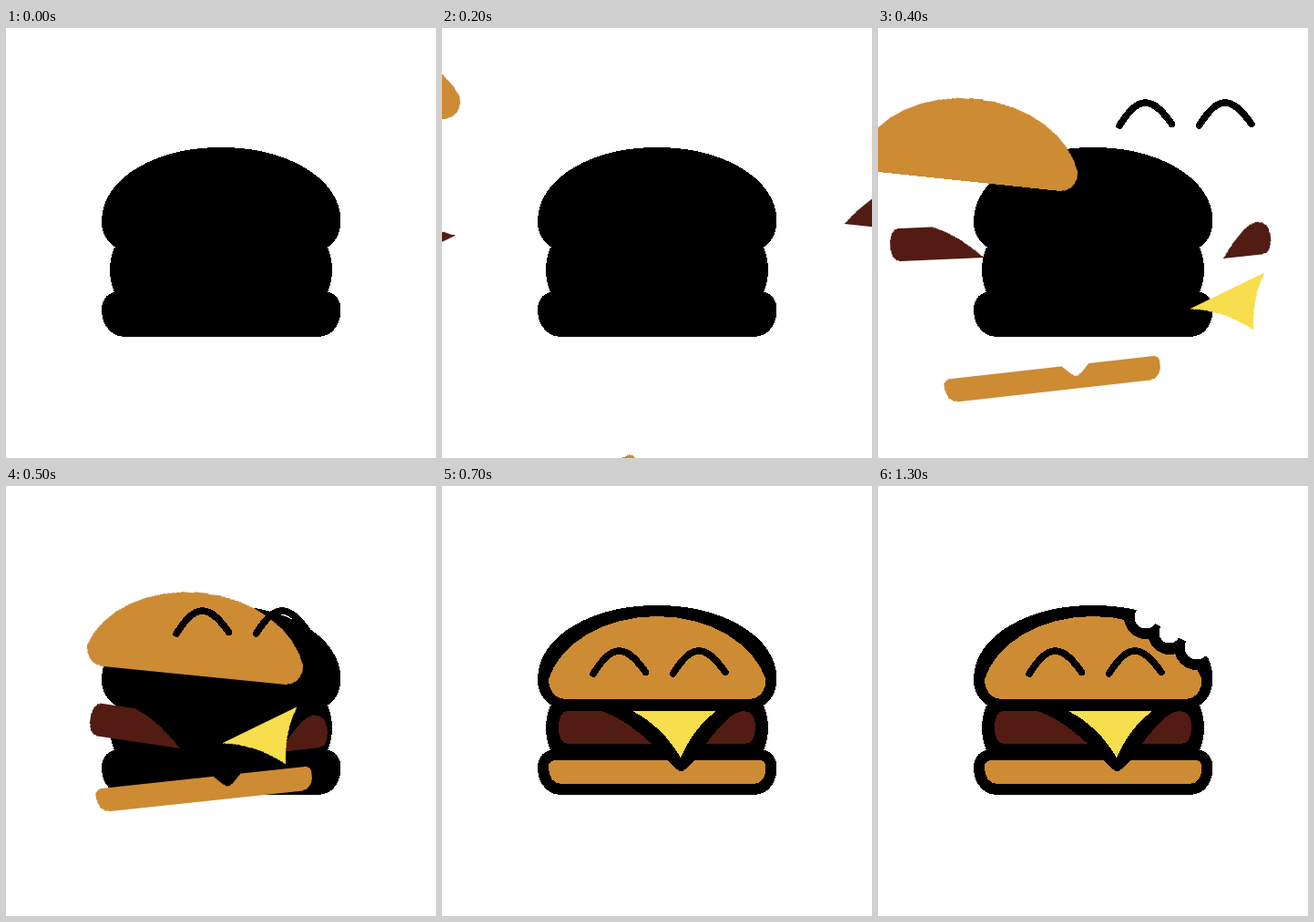
These frames come from a looping animation (472 by 472 pixels, 1.9 s). An HTML page:

```html
<!DOCTYPE html>
<html lang="en">
<head>
<meta charset="utf-8">
<title>Burger</title>
<style>
  html, body { margin: 0; width: 100%; height: 100%; overflow: hidden; background: #fff; }
  svg { display: block; width: 472px; height: 472px; shape-rendering: crispEdges; }

  .bun { fill: #cd8b34; }
  .meat { fill: #521c12; }
  .cheese { fill: #f7de4d; }
  .ink { stroke: #000; stroke-width: 24; stroke-linejoin: round; }
  .eye { fill: none; stroke: #000; stroke-width: 7.6; stroke-linecap: round; }

  .fly { animation: 1900ms step-end infinite; }
  #top    { transform-origin: 236.5px 188px;   animation-name: top; }
  #bottom { transform-origin: 236.5px 313.5px; animation-name: bottom; }
  #left   { transform-origin: 230px 282px;     animation-name: left; }
  #right  { transform-origin: 290px 282px;     animation-name: right; }
  #cheese { transform-origin: 209px 247px;     animation-name: cheese; }
  #eyes   { animation-name: eyes; }
  #bite   { animation: bite 1900ms step-end infinite; }

  /* one step every 100 ms, then the assembled burger rests */
  @keyframes top {
    0%      { transform: translate(-600px, -200px); }
    5.263%  { transform: translate(-440px, -150px) rotate(-14deg); }
    10.526% { transform: translate(-338px, -120px) rotate(-8deg); }
    15.789% { transform: translate(-234px, -92px) rotate(-1.6deg); }
    21.052% { transform: translate(-132.7px, -65.4px) rotate(6deg); }
    26.315% { transform: translate(-26px, -26px) rotate(5.7deg); }
    31.578% { transform: translate(-4px, 1px) rotate(1.5deg); }
    36.842%, 100% { transform: none; }
  }
  @keyframes bottom {
    0%      { transform: translate(-250px, 400px); }
    5.263%  { transform: translate(-190px, 290px) rotate(-30deg); }
    10.526% { transform: translate(-131px, 211px) rotate(-23deg); }
    15.789% { transform: translate(-83.5px, 135.5px) rotate(-15deg); }
    21.052% { transform: translate(-44.5px, 71.5px) rotate(-6.4deg); }
    26.315% { transform: translate(-18.5px, 19px) rotate(-6.1deg); }
    31.578% { transform: translate(-4px, 5px) rotate(-2.5deg); }
    36.842%, 100% { transform: none; }
  }
  @keyframes left {
    0%      { transform: translate(-400px, -80px); }
    5.263%  { transform: translate(-270px, -65px) rotate(-35deg); }
    10.526% { transform: translate(-216px, -55px) rotate(-25deg); }
    15.789% { transform: translate(-164px, -42px) rotate(-14.3deg); }
    21.052% { transform: translate(-114px, -31px) rotate(-2.5deg); }
    26.315% { transform: translate(-39px, 5px) rotate(8.5deg); }
    31.578% { transform: translate(-5px, 2px) rotate(3deg); }
    36.842%, 100% { transform: none; }
  }
  @keyframes right {
    0%      { transform: translate(300px, -120px); }
    5.263%  { transform: translate(178px, -88px) rotate(12deg); }
    10.526% { transform: translate(152px, -68px) rotate(6deg); }
    15.789% { transform: translate(126px, -47px); }
    21.052% { transform: translate(89px, -30px) rotate(-6deg); }
    26.315% { transform: translate(11px, 9px) rotate(-6.5deg); }
    31.578% { transform: translate(2px, 3px) rotate(-2deg); }
    36.842%, 100% { transform: none; }
  }
  @keyframes cheese {
    0%      { transform: translate(450px, 220px); }
    5.263%  { transform: translate(370px, 180px) rotate(-26deg); }
    10.526% { transform: translate(291px, 139px) rotate(-26deg); }
    15.789% { transform: translate(212px, 100.5px) rotate(-26deg); }
    21.052% { transform: translate(133px, 61.5px) rotate(-26deg); }
    26.315% { transform: translate(28px, 35.5px) rotate(-26deg); }
    31.578% { transform: translate(5px, 7px) rotate(-7deg); }
    36.842%, 100% { transform: none; }
  }
  @keyframes eyes {
    0%      { transform: translate(400px, -360px); }
    5.263%  { transform: translate(327px, -291px); }
    10.526% { transform: translate(251px, -227px); }
    15.789% { transform: translate(175px, -163px); }
    21.052% { transform: translate(99px, -99px); }
    26.315% { transform: translate(21px, -44px); }
    31.578% { transform: translate(4px, -8px); }
    36.842%, 100% { transform: none; }
  }
  @keyframes bite {
    0% { visibility: hidden; }
    68.421%, 100% { visibility: visible; }
  }
</style>
</head>
<body>
<svg viewBox="0 0 472 472">
  <defs>
    <path id="topShape" d="M136 233.800C124 233.800 117 224 117 212C129 174 176 143 236 143C296 143 342 174 355.500 212C356 224 348 233.800 338 233.800Z"/>
    <path id="bottomShape" d="M125 301H247L258 311Q262 315 267 311L277 301H348Q355.500 301 355.500 309C355.500 319 351 326.800 343 326.800H130C122 326.800 117 319 117 309Q117 301 125 301Z"/>
    <path id="eye" d="M166 206C176 191 184 181 194.500 181C205 181 214 191 223.500 204.500"/>
    <clipPath id="inTop"><use href="#topShape"/></clipPath>
  </defs>

  <g id="shadow">
    <path class="ink" d="M136 233C124 233 117 224 117 212C117 172 172 143 236 143C300 143 355.500 172 355.500 212C355.500 224 348 233 338 233Z"/>
    <path d="M119 241Q109 266 119 290V303H353V290Q363 266 353 241Z"/>
    <use href="#bottomShape" class="ink"/>
  </g>

  <g id="bottom" class="fly bun"><use href="#bottomShape"/></g>
  <g id="left" class="fly meat">
    <path d="M175 247H138C131 247 128 255 128 264.500C128 275 131 282.800 138 282.800H230C216 270 197 254 175 247Z"/>
  </g>
  <g id="right" class="fly meat">
    <path d="M290 282.800H333C341 282.800 344 275 344 264C344 254 340 247 331 247C318 247 303 266 290 282.800Z"/>
  </g>
  <g id="cheese" class="fly cheese">
    <path d="M209 247H301Q275 267 262 298.500Q242 264 209 247Z"/>
  </g>
  <g id="top" class="fly bun"><use href="#topShape"/></g>
  <g id="eyes" class="fly eye">
    <use href="#eye"/>
    <use href="#eye" x="87.500"/>
  </g>

  <g id="bite">
    <g clip-path="url(#inTop)">
      <circle cx="294" cy="144" r="24"/>
      <circle cx="320" cy="161" r="24"/>
      <circle cx="350" cy="177" r="25"/>
    </g>
    <g fill="#fff">
      <circle cx="294" cy="144" r="12.500"/>
      <circle cx="320" cy="161" r="11.500"/>
      <circle cx="350" cy="177" r="13.500"/>
      <path d="M284 125V136L294 144L320 161L350 177L361 188H380V125Z"/>
    </g>
  </g>
</svg>
</body>
</html>
```
